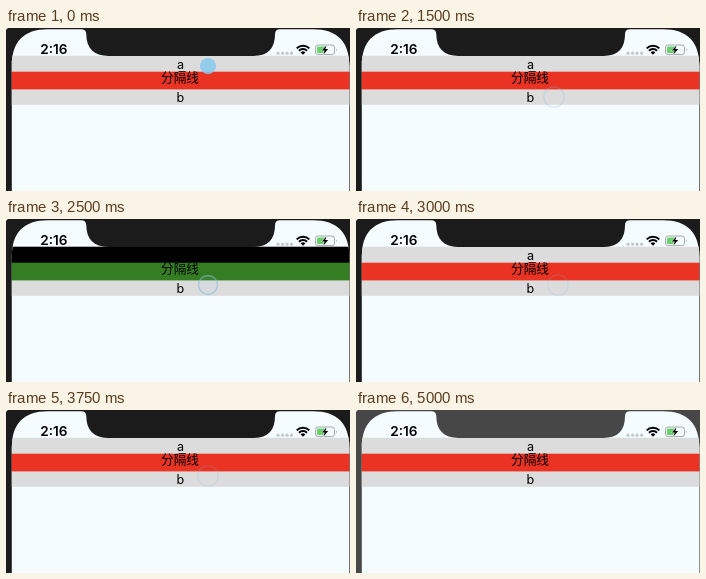
Animation, 344 px wide and 163 px high, one loop 5250 ms. Source, as an HTML page:

```html
<!DOCTYPE html>
<html lang="zh">
<head>
<meta charset="utf-8">
<title>Separator highlight</title>
<style>
  html, body { margin: 0; width: 100%; height: 100%; overflow: hidden; background: #1b1b1b; }
  svg { display: block; width: 344px; height: 163px; }
  svg * { animation: 5250ms step-end infinite; }

  text { font: 12.6px Inter, "Noto Sans CJK SC", "Noto Sans CJK", sans-serif; text-anchor: middle; }
  .clock { font-size: 13.6px; font-weight: 600; text-anchor: start; }

  .bezel { fill: #1b1b1b; animation-name: bezel; }
  .row { fill: #dcdcdc; }
  .press { animation-name: press; }
  .line { fill: #ea3323; animation-name: line; }
  .touch { fill: #86c8ee; stroke: #7fbbe0; stroke-width: 1.3; animation-name: touch; }

  @keyframes bezel {
    0% { fill: #1b1b1b; }
    95.23%, 100% { fill: #474747; }
  }
  @keyframes press {
    0%, 57.14%, 71.42%, 100% { fill: #dcdcdc; }
    47.61%, 61.9% { fill: #000; }
  }
  @keyframes line {
    0%, 57.14%, 71.42%, 100% { fill: #ea3323; }
    47.61%, 61.9% { fill: #357d22; }
  }
  @keyframes touch {
    0% { cx: 202px; cy: 38px; r: 8px; fill-opacity: .85; stroke-opacity: 0; }
    9.52% { cx: 202px; cy: 42px; r: 8px; fill-opacity: .85; stroke-opacity: 0; }
    14.28% { cx: 198px; cy: 62px; r: 9.3px; fill-opacity: .04; stroke-opacity: .5; }
    28.57% { cx: 198px; cy: 69px; r: 10.2px; fill-opacity: 0; stroke-opacity: .24; }
    33.33% { fill-opacity: 0; stroke-opacity: 0; }
    38.09% { cx: 191px; cy: 86px; r: 9.3px; fill-opacity: .04; stroke-opacity: .45; }
    42.85% { cx: 202px; cy: 66px; r: 10px; fill-opacity: 0; stroke-opacity: .3; }
    47.61%, 61.9% { cx: 202px; cy: 66px; r: 9.5px; fill-opacity: .06; stroke-opacity: .6; }
    57.14%, 71.42% { cx: 202px; cy: 66px; r: 10.2px; fill-opacity: 0; stroke-opacity: .18; }
    76.19% { cx: 202px; cy: 65.5px; r: 9.5px; fill-opacity: 0; stroke-opacity: .12; }
    80.95%, 100% { fill-opacity: 0; stroke-opacity: 0; }
  }
</style>
</head>
<body>
<svg viewBox="0 0 344 163">
  <defs>
    <clipPath id="screen">
      <path d="M5.8 163V38C5.8 14 17.5 1.3 42 1.3H75Q80.3 1.3 80.3 6.3C80.3 20 88 28 102 28H248C262 28 269 20 269 6.3Q269 1.3 274 1.3H307C331.5 1.3 343.4 14 343.4 38V163Z"/>
    </clipPath>
  </defs>

  <rect class="bezel" width="344" height="163"/>
  <path d="M0 0H2L0 2Z" fill="#ddd"/>

  <g clip-path="url(#screen)">
    <rect width="344" height="163" fill="#f5fcff"/>
    <rect class="row press" x="5" y="27.7" width="339" height="16.3"/>
    <rect class="row" x="5" y="61" width="339" height="15.8"/>
    <rect class="line" x="5" y="43.7" width="339" height="17.7"/>
  </g>

  <text x="174.5" y="40.5">a</text>
  <text x="174" y="54.3">分隔线</text>
  <text x="174.3" y="73.5">b</text>

  <!-- status bar -->
  <text class="clock" x="34.2" y="26.2">2:16</text>
  <g fill="#c3c8ca">
    <circle cx="272" cy="25.2" r="1.6"/>
    <circle cx="276.6" cy="25.2" r="1.6"/>
    <circle cx="281.1" cy="25.2" r="1.6"/>
    <circle cx="285.6" cy="25.2" r="1.6"/>
  </g>
  <path d="M297 26.8L294.7 24.4A3.3 3.3 0 0 1 299.3 24.4Z"/>
  <path d="M293 22.7A5.6 5.6 0 0 1 301 22.7M290.7 20.4A8.9 8.9 0 0 1 303.3 20.4" fill="none" stroke="#000" stroke-width="2"/>
  <rect x="309.5" y="17" width="19" height="9.6" rx="2.6" fill="none" stroke="#a3a8aa"/>
  <path d="M330 20.2Q331.6 21.8 330 23.4Z" fill="#a3a8aa"/>
  <rect x="311" y="18.5" width="9" height="6.6" rx="1.2" fill="#6bd16d"/>
  <path d="M320.6 17.2L315.8 22.5H318.7L317.4 26.4L322.2 21.1H319.3Z" stroke="#f5fcff" stroke-width="1" paint-order="stroke"/>

  <circle class="touch" cx="202" cy="38" r="8"/>
</svg>
</body>
</html>
```
